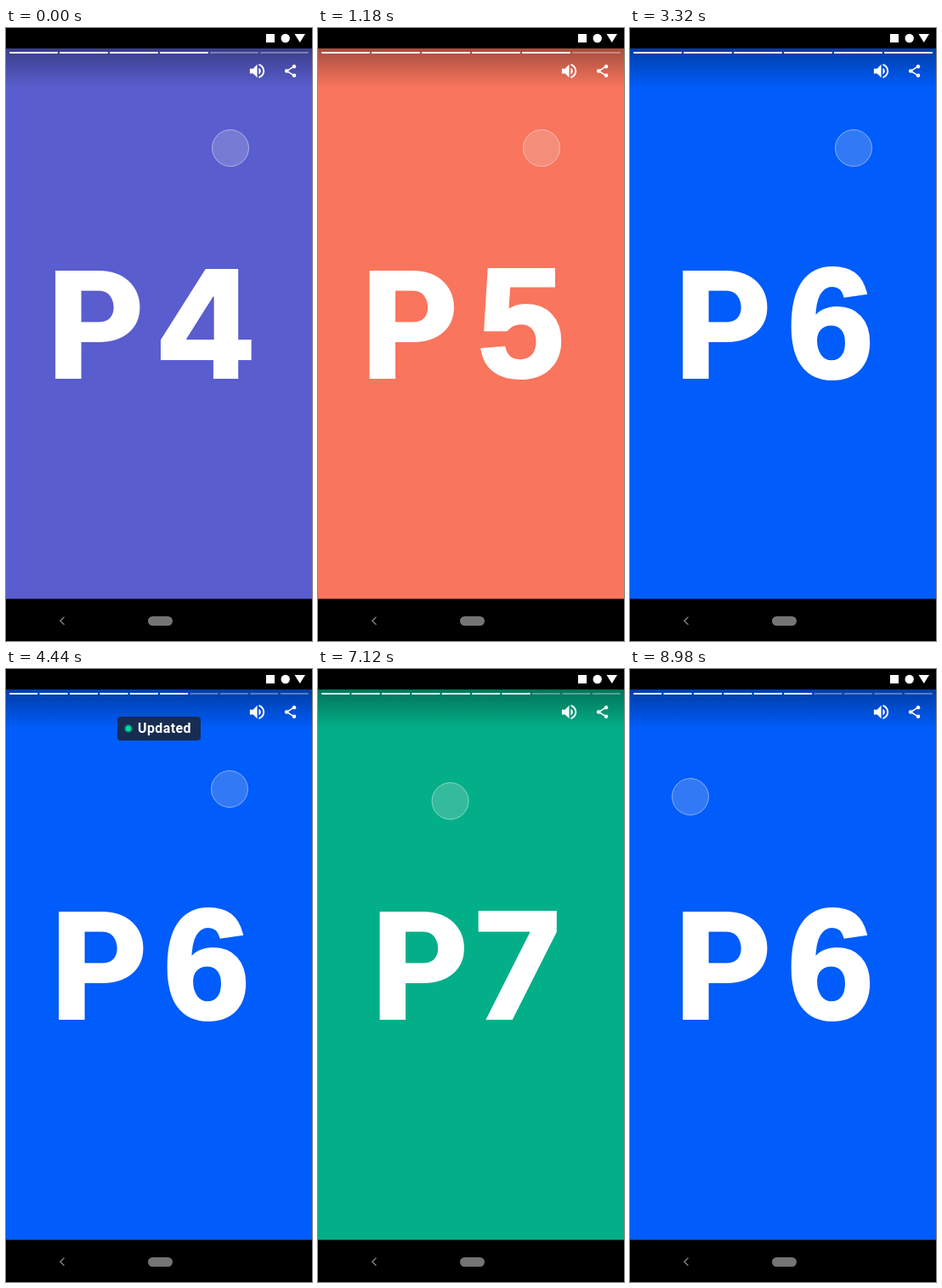
Recreate the animation shown at these times as an HTML page with a canvas. Size 360 px wide and 720 px high, loop 9 s.

```html
<!DOCTYPE html>
<html lang="en">
<head>
<meta charset="utf-8">
<title>Live story</title>
<style>
html, body { margin: 0; width: 100%; height: 100%; overflow: hidden; background: #000; }
canvas { display: block; width: 360px; height: 720px; }
</style>
</head>
<body>
<canvas id="stage"></canvas>
<script>
const LOOP = 9000;
const canvas = document.getElementById('stage');
const ctx = canvas.getContext('2d');
const dpr = window.devicePixelRatio || 1;
canvas.width = 360 * dpr;
canvas.height = 720 * dpr;

const LETTER = { weight: 900, family: 'Roboto, sans-serif', outline: 0 };
const STRAIGHT = { weight: 800, family: 'Inter, sans-serif', outline: 0 };
const ROUND = { weight: 700, family: '"Liberation Sans", Arial, sans-serif', outline: 4 };

// Each page: colour, left edge of the P, ink box and face of the digit
const pages = {
  4: { color: '#595dce', px: 59, box: [182, 283, 289, 412], face: STRAIGHT },
  5: { color: '#f9755d', px: 61.5, box: [192, 281.5, 286, 413], face: ROUND },
  6: { color: '#005cfa', px: 63, box: [188, 279.5, 284, 413.5], face: ROUND },
  7: { color: '#03af88', px: 73.5, box: [191, 283.5, 278, 412], face: STRAIGHT }
};
const cuts = [[0, 4], [600, 5], [1800, 6], [6000, 7], [8000, 6]];
const taps = cuts.slice(1).map(c => c[0]);
const TOAST_IN = 3400, TOAST_OUT = 5300;

const ramp = (t, start, length) => Math.min(1, Math.max(0, (t - start) / length));
const smooth = u => u * u * (3 - 2 * u);
const ease = (t, start, length) => smooth(ramp(t, start, length));
const white = a => `rgba(255,255,255,${a})`;

function rect(x, y, w, h, color, r = 0) {
  ctx.fillStyle = color;
  ctx.beginPath();
  ctx.roundRect(x, y, w, h, r);
  ctx.fill();
}

function disc(x, y, r, color) {
  ctx.fillStyle = color;
  ctx.beginPath();
  ctx.arc(x, y, r, 0, Math.PI * 2);
  ctx.fill();
}

function line(points, color, width) {
  ctx.strokeStyle = color;
  ctx.lineWidth = width;
  ctx.beginPath();
  points.forEach(([x, y]) => ctx.lineTo(x, y));
  ctx.stroke();
}

// Sets a character at the size whose ink height fills the box, centred in it
function glyph(char, [x0, y0, x1, y1], { weight, family, outline }) {
  const measure = size => {
    ctx.font = `${weight} ${size}px ${family}`;
    return ctx.measureText(char);
  };
  let m = measure(200);
  const ink = m.actualBoundingBoxAscent + m.actualBoundingBoxDescent;
  m = measure(200 * (y1 - y0 - outline) / ink);
  const x = (x0 + x1 + m.actualBoundingBoxLeft - m.actualBoundingBoxRight) / 2;
  const y = y1 - outline / 2 - m.actualBoundingBoxDescent;
  ctx.fillStyle = ctx.strokeStyle = '#fff';
  ctx.fillText(char, x, y);
  if (outline) {
    ctx.lineWidth = outline;
    ctx.lineJoin = 'miter';
    ctx.miterLimit = 3;
    ctx.strokeText(char, x, y);
  }
}

function drawPage(id) {
  const { color, px, box, face } = pages[id];
  rect(0, 24, 360, 647, color);
  const shade = ctx.createLinearGradient(0, 24, 0, 70);
  shade.addColorStop(0, 'rgba(0,0,0,.34)');
  shade.addColorStop(1, 'rgba(0,0,0,0)');
  rect(0, 24, 360, 46, shade);
  glyph('P', [px, 285, px + 97, 412], LETTER);
  glyph(String(id), box, face);
}

function drawProgress(t, cut) {
  const count = 6 + 4 * ease(t, TOAST_IN, 250);
  const pitch = 354 / count;
  const from = cut ? cuts[cut - 1][1] : 4;
  const [start, to] = cuts[cut];
  const done = from + (to - from) * ease(t, start, 200);
  for (let i = 0; i < count; i++) {
    const x = 4 + i * pitch;
    const w = Math.min(pitch - 2, 356 - x);
    if (w <= 0) continue;
    rect(x, 28, w, 2, white(.32), 1);
    const part = Math.min(1, Math.max(0, done - i));
    if (part) rect(x, 28, w * part, 2, '#fff', 1);
  }
}

const speaker = new Path2D('M3 9v6h4l5 5V4L7 9H3zM16.5 12c0-1.77-1.02-3.29-2.5-4.03v8.05' +
  'c1.48-.73 2.5-2.25 2.5-4.02zM14 3.23v2.06c2.89.86 5 3.54 5 6.71s-2.11 5.85-5 6.71v2.06' +
  'c4.01-.91 7-4.49 7-8.77s-2.99-7.86-7-8.77z');

function drawIcons() {
  ctx.save();
  ctx.translate(284, 39);
  ctx.scale(.96, .96);
  ctx.fillStyle = '#fff';
  ctx.fill(speaker);
  ctx.restore();

  const nodes = [[339, 45.2], [330.2, 50.5], [339, 55.8]];
  line(nodes, '#fff', 1.5);
  nodes.forEach(([x, y]) => disc(x, y, 2.3, '#fff'));
}

function drawSystem() {
  rect(0, 0, 360, 24, '#000');
  rect(0, 670.5, 360, 49.5, '#000');
  rect(306, 7, 10, 10, '#fff');
  disc(328.7, 12, 5.2, '#fff');
  ctx.beginPath();
  ctx.moveTo(339.5, 7);
  ctx.lineTo(352, 7);
  ctx.lineTo(345.75, 17);
  ctx.fill();
  line([[68.5, 691.8], [63.8, 696.3], [68.5, 700.8]], '#858585', 1.3);
  rect(167, 691, 29, 11, '#757575', 5.5);
}

function drawToast(t) {
  const show = ease(t, TOAST_IN, 250) * (1 - ease(t, TOAST_OUT, 250));
  if (!show) return;
  ctx.save();
  ctx.globalAlpha = show;
  ctx.translate(0, -10 * (1 - show));
  rect(131, 56, 98, 28, '#182c52', 4);
  disc(144, 70, 5, '#0b6b68');
  disc(144, 70, 3.4, '#00d6a0');
  ctx.font = '700 16px Roboto, sans-serif';
  ctx.letterSpacing = '0.4px';
  ctx.fillStyle = '#fff';
  ctx.fillText('Updated', 155, 75.3);
  ctx.restore();
}

function drawTouch(t) {
  const move = ease(t, 6700, 780);
  const x = 264 - ramp(t, 0, 600) - 192 * move;
  const y = 141 + 9 * move + 9.2 * Math.sin(Math.PI * move);
  const press = Math.max(...taps.map(tap => ramp(t, tap - 150, 60) * (1 - ramp(t, tap, 80))));
  disc(x, y, 21.5 - press, `rgba(228,228,228,${.22 + .45 * press})`);
  ctx.strokeStyle = white(.45);
  ctx.lineWidth = 1;
  ctx.stroke();
}

function draw() {
  const t = performance.now() % LOOP;
  const cut = cuts.findLastIndex(c => t >= c[0]);
  ctx.setTransform(dpr, 0, 0, dpr, 0, 0);
  drawPage(cuts[cut][1]);
  drawProgress(t, cut);
  drawIcons();
  drawToast(t);
  drawTouch(t);
  drawSystem();
  requestAnimationFrame(draw);
}
draw();
</script>
</body>
</html>
```
